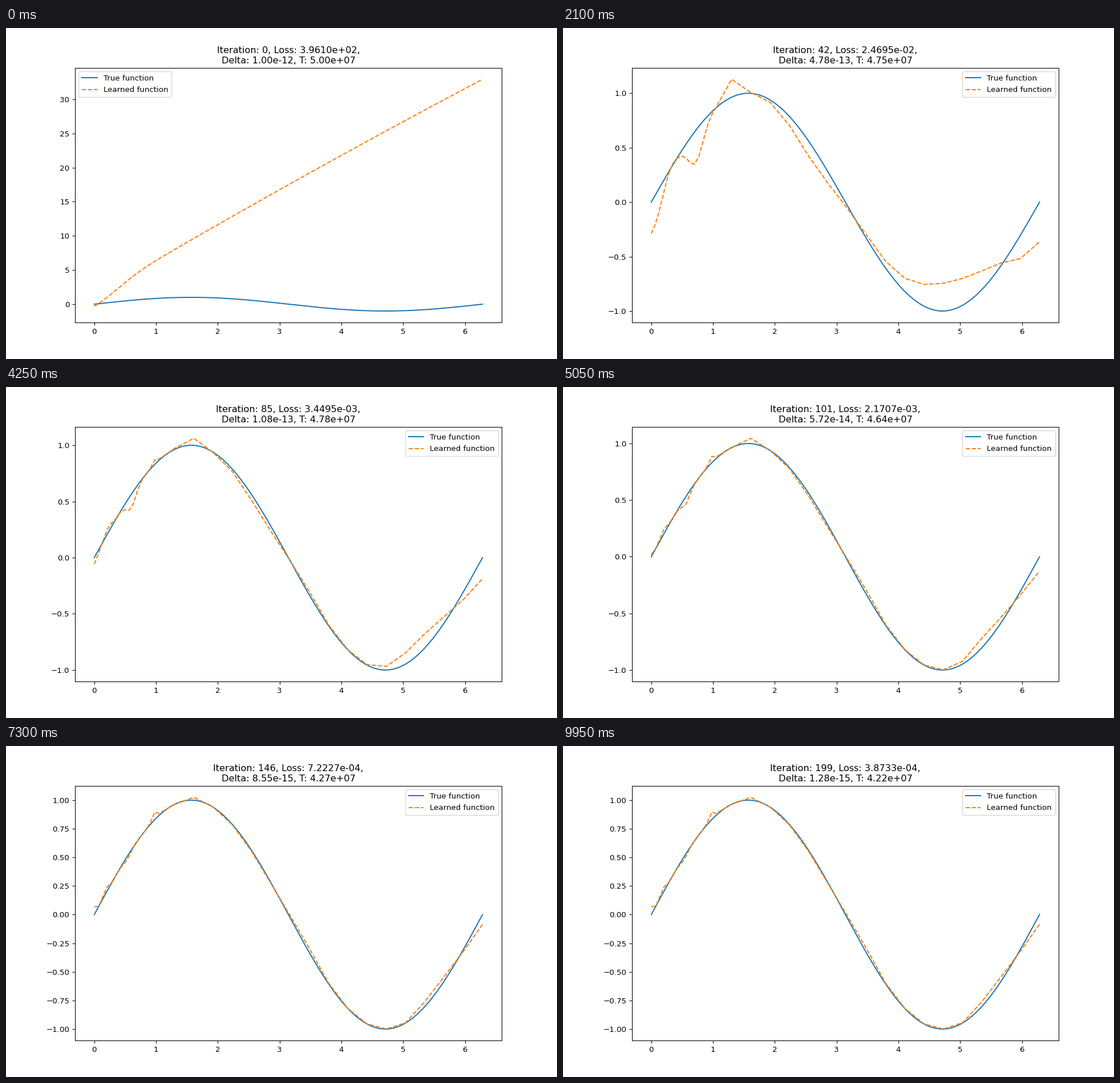
Recreate the animation shown at these times as a matplotlib script. Size 966 px wide and 580 px high, loop 10 s.

```python
import numpy as np
import matplotlib.pyplot as plt
from matplotlib.animation import FuncAnimation

FRAMES = 200
INTERVAL = 50
DPI = 96.6
WIDTH, HEIGHT = 966, 580
ROUGH_UNTIL = 42  # iteration at which the rough fit starts to settle

# iteration, loss, delta, T
READOUTS = np.array([
    (0, 3.9610e+02, 1.00e-12, 5.00e7),
    (42, 2.4695e-02, 4.78e-13, 4.75e7),
    (85, 3.4495e-03, 1.08e-13, 4.78e7),
    (117, 1.4615e-03, 3.03e-14, 4.50e7),
    (146, 7.2227e-04, 8.55e-15, 4.27e7),
    (178, 5.5659e-04, 2.17e-15, 4.27e7),
    (199, 3.8733e-04, 1.28e-15, 4.22e7),
])

# Fit errors as bumps: (centre, width, height) when rough and when settled
BUMPS = np.array([
    [(0, .24, -.29), (0, .02, .07)],
    [(.3, .12, .06), (.19, .06, .04)],
    [(.72, .17, -.30), (.53, .07, -.03)],
    [(.98, .06, 0), (.98, .06, .065)],
    [(1.33, .17, .17), (1.65, .16, .027)],
    [(2.6, .5, -.14), (2.7, .4, -.01)],
    [(3.5, .3, .02), (3.4, .3, .04)],
    [(4.85, .85, .26), (5.5, .25, .06)],
    [(2 * np.pi, .5, -.38), (2 * np.pi, .25, -.085)],
])

x = np.linspace(0, 2 * np.pi, 250)
# the fit is piecewise linear, with its corners closer together on the left
corners = np.concatenate([np.linspace(0, 1.05, 16), np.linspace(1.3, 2 * np.pi, 17)])


def bump(centre, width, height):
    return height * np.exp(-((corners - centre) / width) ** 2)


first_guess = 1.15 + 5.34 * corners - .045 * corners ** 2 + bump(0, .55, -1.45)


def learned(frame):
    rough = np.exp(-(max(frame - ROUGH_UNTIL, 0) / 42) ** 2)
    shapes = rough * BUMPS[:, 0] + (1 - rough) * BUMPS[:, 1]
    fitted = np.sin(corners) + sum(bump(*shape) for shape in shapes)
    return fitted + np.exp(-frame / 2) * (first_guess - fitted)


def readout(frame):
    steps, loss, delta, temp = READOUTS.T
    return (np.exp(np.interp(np.log1p(frame), np.log1p(steps), np.log(loss))),
            np.exp(np.interp(frame, steps, np.log(delta))),
            np.interp(frame, steps, temp))


# the tiny margin guards against rounding down to one pixel less
fig, ax = plt.subplots(figsize=(WIDTH / DPI + 1e-6, HEIGHT / DPI + 1e-6), dpi=DPI)
ax.plot(x, np.sin(x), label="True function")
fit, = ax.plot(corners, learned(0), "--", label="Learned function")
ax.legend(borderpad=.435, labelspacing=.535)


def update(frame):
    fit.set_ydata(learned(frame))
    ax.relim()
    ax.autoscale_view()
    loss, delta, temp = readout(frame)
    ax.set_title(f"Iteration: {frame}, Loss: {loss:.4e},\n"
                 f"Delta: {delta:.2e}, T: {temp:.2e}")
    return fit,


anim = FuncAnimation(fig, update, frames=FRAMES, interval=INTERVAL,
                     init_func=lambda: update(0), repeat=True, repeat_delay=0)
plt.show()
```
